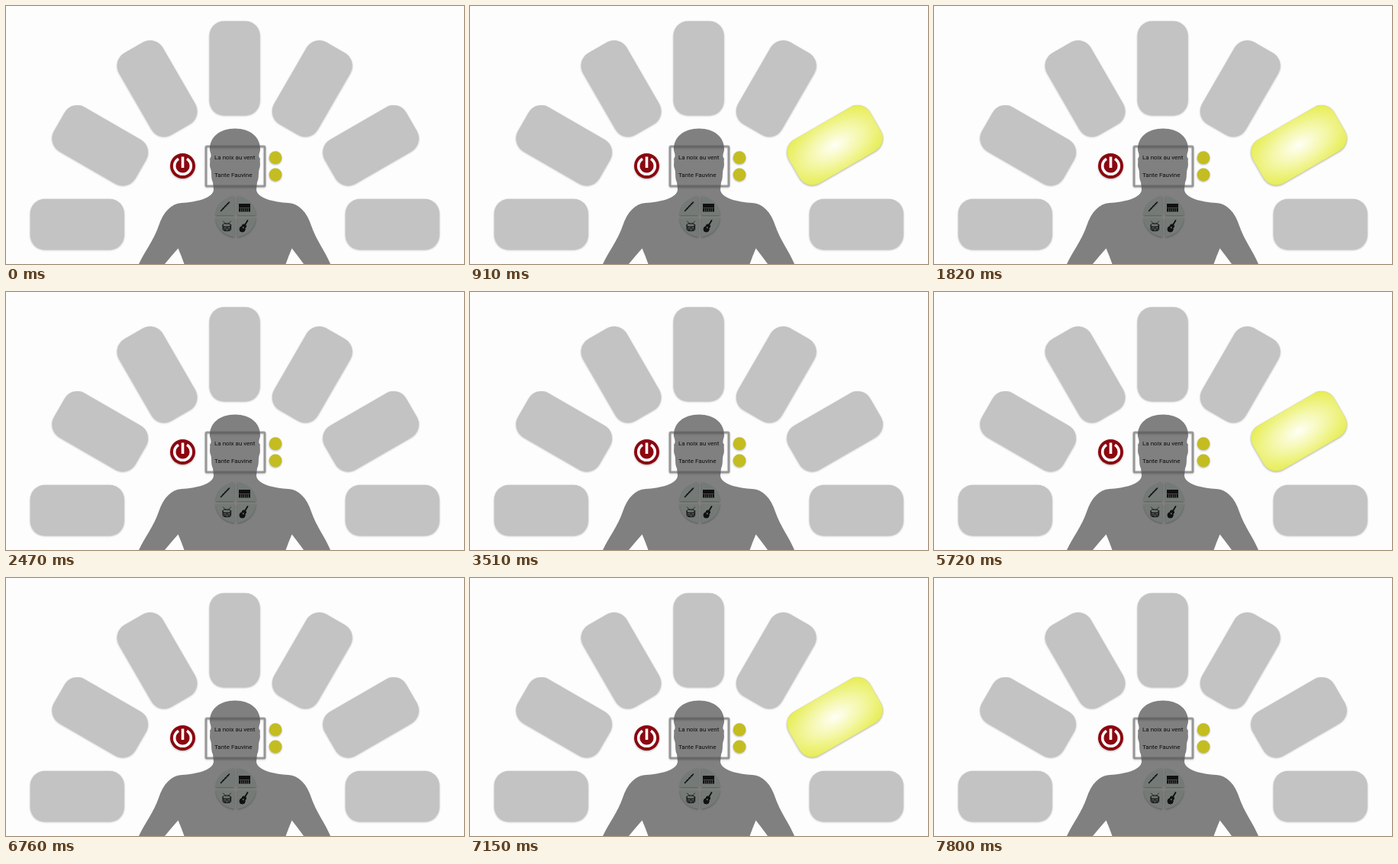
Write an HTML page that moves like this. It is 600 by 338 pixels and loops after 8 s.

```html
<!DOCTYPE html>
<html lang="fr">
<head>
<meta charset="utf-8">
<title>Pads</title>
<style>
html, body { margin: 0; width: 100%; height: 100%; overflow: hidden; background: #fdfdfd; }
svg { display: block; width: 600px; height: 338px; }
text { font: 8px Roboto, sans-serif; fill: #0c0c0c; }
.raised { filter: drop-shadow(0 1.5px 1.2px rgba(0, 0, 0, .3)); }
.lit { opacity: 0; }
</style>
</head>
<body>
<svg viewBox="0 0 600 338">
  <defs>
    <radialGradient id="glow" r=".62">
      <stop offset="0" stop-color="#fffff6"/>
      <stop offset=".5" stop-color="#f4f7a8"/>
      <stop offset="1" stop-color="#e7ed55"/>
    </radialGradient>
    <path id="quarter" d="M2 2H26.4A26.5 26.5 0 0 1 2 26.4Z"/>
  </defs>

  <g id="pads" class="raised"></g>

  <path fill="#808080" d="M174 338C182 321 194 306 200 288C206 270 216 259 230 258
    C248 257 272 252 272 240L271 231C268 225 270 219 268 213C266 208 268 204 267 200
    C270 197 268 193 267 189C266 172 280 160.500 300 160.500S334 172 333 189
    C332 193 330 197 333 200C332 204 334 208 332 213C330 219 332 225 329 231L328 240
    C328 252 352 257 370 258C384 259 394 270 400 288C406 306 418 321 425 338H390
    Q382 327 374.500 317.500Q370 328 366.500 338H233.500Q230 328 225.500 317.500Q217 327 208 338Z"/>

  <g class="raised">
    <rect x="262" y="184" width="77" height="52" rx="1" fill="none" stroke="#5c5c5c" stroke-opacity=".55" stroke-width="3"/>
  </g>
  <text x="273" y="201.300">La noix au vent</text>
  <text x="273" y="224.100">Tante Fauvine</text>

  <g class="raised" fill="#c3bd22">
    <circle cx="353" cy="198.700" r="8.400"/>
    <circle cx="353" cy="221" r="8.400"/>
  </g>

  <g transform="translate(231.500 209.500)">
    <circle class="raised" r="16.500" fill="#8a0710"/>
    <path d="M-5.500 -9.300A10.800 10.800 0 1 0 5.500 -9.300M0 -12V2.500" fill="none" stroke="#fff" stroke-width="3.600"/>
  </g>

  <g class="raised" transform="translate(301 276)" fill="#747a75">
    <use href="#quarter"/>
    <use href="#quarter" transform="rotate(90)"/>
    <use href="#quarter" transform="rotate(180)"/>
    <use href="#quarter" transform="rotate(270)"/>
  </g>

  <g fill="#111" stroke="#111" stroke-linecap="round">
    <path d="M281.500 268.500L292.500 257" stroke-width="1.600"/>
    <path d="M284 264.500l1.200 1.200M287 261.500l1.200 1.200M290 258.500l1.200 1.200" stroke-width=".8"/>

    <path stroke="none" d="M305 259h15v10.500h-15Z"/>
    <path stroke="#747a75" stroke-width=".6" d="M307.500 266v3M310 266v3M312.500 266v3M315 266v3M317.500 266v3M306 264.500h13"/>

    <path fill="#4c504d" stroke-width="1" d="M284 287v5.500a5.300 2.200 0 0 0 10.600 0V287"/>
    <ellipse cx="289.300" cy="287" rx="5.300" ry="2.100" fill="#747a75"/>
    <path fill="none" stroke-width=".8" d="M284.500 289l2.500 5l2.500 -4.500l2.500 4.500l2.300 -5M284.500 282l4 4M294.500 282l-4 4"/>

    <path d="M311.500 289.500L316.500 281" stroke-width="1.800"/>
    <circle cx="311.800" cy="288.600" r="2.700"/>
    <circle cx="309.600" cy="292.400" r="3.600"/>
    <circle cx="310.800" cy="290.300" r="1" fill="#747a75" stroke="none"/>
  </g>
</svg>
<script>
const LOOP = 8000;
// centre x, centre y, angle, [on, off] times in ms
const PADS = [
  [93.3, 285.7, -90, []],
  [123.2, 182.3, -60, [[3770, 4420]]],
  [198, 107.8, -30, [[2860, 3510]]],
  [299.6, 81.3, 0, []],
  [401.2, 107.8, 30, []],
  [478, 182.3, 60, [[910, 1560], [1820, 2470], [5720, 6370], [7020, 7670]]],
  [506.200, 285.7, 90, []]
];

const group = document.getElementById('pads');

function addRect(x, y, angle, fill) {
  const rect = document.createElementNS('http://www.w3.org/2000/svg', 'rect');
  const attrs = {
    x: -33, y: -61.5, width: 66, height: 123, rx: 19, fill,
    transform: `translate(${x} ${y}) rotate(${angle})`
  };
  for (const key in attrs) rect.setAttribute(key, attrs[key]);
  return group.appendChild(rect);
}

function blink(el, spans) {
  const easing = 'steps(1, end)';
  const frames = [{ opacity: 0, offset: 0, easing }];
  for (const [on, off] of spans) {
    frames.push({ opacity: 1, offset: on / LOOP, easing }, { opacity: 0, offset: off / LOOP, easing });
  }
  frames.push({ opacity: 0, offset: 1 });
  el.animate(frames, { duration: LOOP, iterations: Infinity });
}

for (const [x, y, angle, spans] of PADS) {
  addRect(x, y, angle, '#c3c3c3');
  if (!spans.length) continue;
  const lit = addRect(x, y, angle, 'url(#glow)');
  lit.classList.add('lit');
  blink(lit, spans);
}
</script>
</body>
</html>
```
